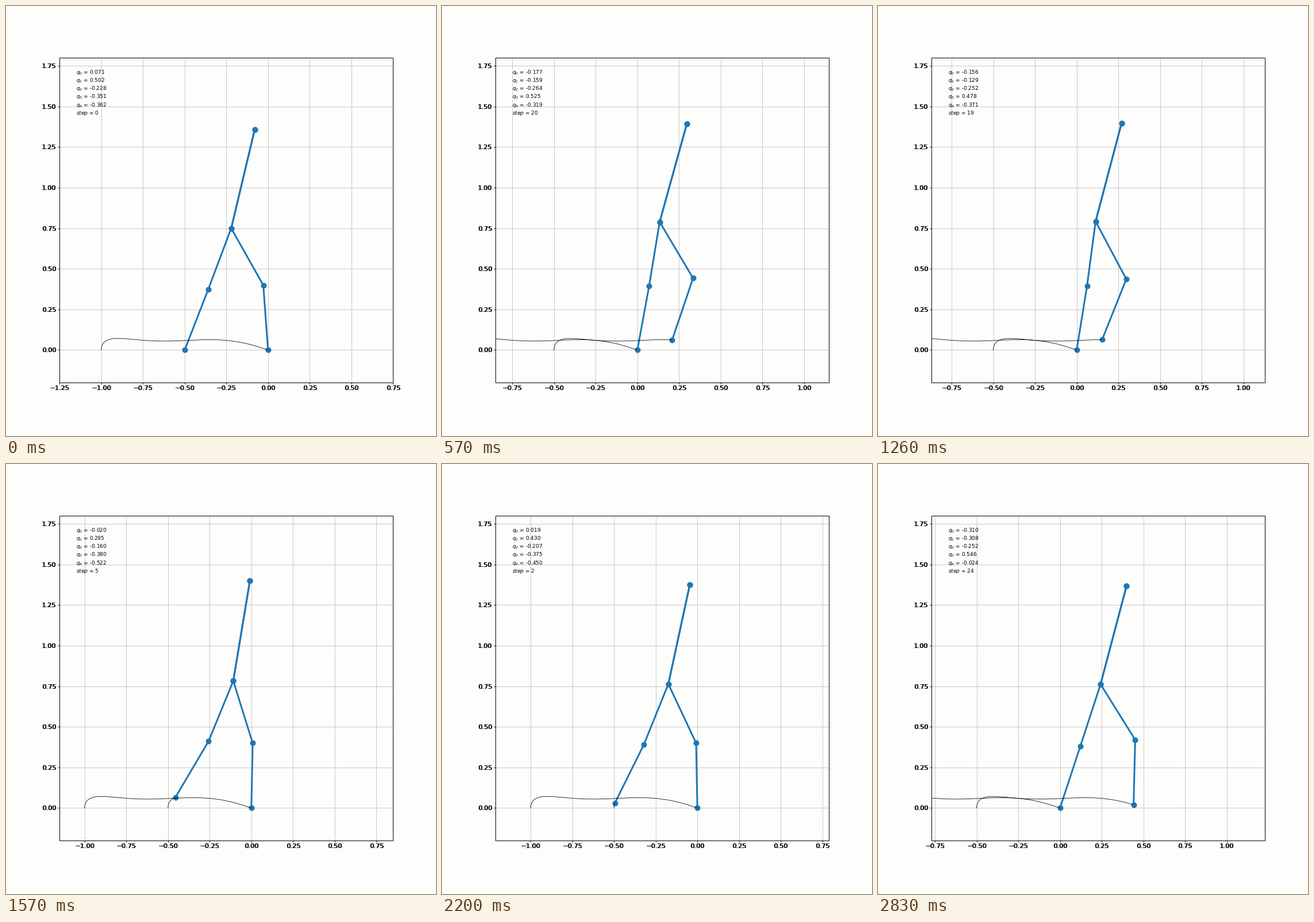
Write a matplotlib script that moves like this. It is 748x748 px and loops after 2860 ms.

```python
import numpy as np
import matplotlib.pyplot as plt
from matplotlib.animation import FuncAnimation

SIZE, DPI = 748, 88
PX = 72 / DPI                 # points per pixel
STEPS = 25                    # poses in one stride
RATE = 0.35                   # poses per 10 ms tick
STRIDE, LEG, TORSO = 0.5, 0.4, 0.625
BLUE, PAPER, GRID = "#1f77b4", "#fdfdfc", "#bcbcbc"

# Key poses: stance shin, stance thigh, torso, swing thigh, swing shin.
POSE_KEYS = {
    0: (0.071, 0.502, -0.228, -0.351, -0.362),
    3: (0.002, 0.386, -0.192, -0.384, -0.480),
    12: (-0.066, 0.043, -0.140, -0.050, -0.549),
    19: (-0.156, -0.129, -0.252, 0.478, -0.371),
    24: (-0.310, -0.308, -0.252, 0.546, -0.024),
}
# The stride ends in its first pose with the legs swapped.
POSE_KEYS[STEPS] = POSE_KEYS[0][::-1]


def stride_angles():
    """One smooth polynomial per link through the key poses."""
    t = np.array(list(POSE_KEYS)) / STEPS
    coefs = np.polyfit(t, np.array(list(POSE_KEYS.values())), len(t) - 1)
    return np.array([np.polyval(coefs, s / STEPS) for s in range(STEPS + 1)])


def link(start, angle, length):
    return start + length * np.array([-np.sin(angle), np.cos(angle)])


def pose(q):
    """Stance foot, stance knee, hip, head, swing knee, swing foot."""
    foot = np.zeros(2)
    knee = link(foot, q[0], LEG)
    hip = link(knee, q[1], LEG)
    head = link(hip, q[2], TORSO)
    swing_knee = link(hip, q[3], -LEG)
    swing_foot = link(swing_knee, q[4], -LEG)
    return np.array([foot, knee, hip, head, swing_knee, swing_foot])


angles = stride_angles()
poses = [pose(q) for q in angles]
path = np.array([p[5] for p in poses])

fig = plt.figure(figsize=(SIZE / DPI, SIZE / DPI), dpi=DPI, facecolor=PAPER)
ax = fig.add_axes([93.3 / SIZE, 93 / SIZE, 580 / SIZE, 565.2 / SIZE],
                  facecolor=PAPER)
ax.set_ylim(-0.2, 1.8)
ax.set_xticks([])
ax.set_yticks([])
for spine in ax.spines.values():
    spine.set_linewidth(PX)

xticks = np.arange(-5, 6) * 0.25
yticks = np.arange(8) * 0.25
along_x, along_y = ax.get_xaxis_transform(), ax.get_yaxis_transform()
for x in xticks:
    ax.axvline(x, color=GRID, lw=0.8 * PX, zorder=1)
for y in yticks:
    ax.axhline(y, color=GRID, lw=0.8 * PX, zorder=1)


def label(value, xy, coords, offsets, **align):
    """Tick label, drawn once per pixel offset for its heavy look."""
    text = f"{value:.2f}".replace("-", "\u2212")
    return [ax.annotate(text, xy, xycoords=coords, xytext=(dx * PX, dy * PX),
                        textcoords="offset points", fontsize=11.3 * PX,
                        **align) for dx, dy in offsets]


xlabels = [label(x, (x, 0), along_x, [(0, -5.3), (1, -5.3)],
                 ha="center", va="top") for x in xticks]
for y in yticks:
    label(y, (0, y), along_y, [(-5.3, 0), (-6.3, 0)],
          ha="right", va="center_baseline")

tick = dict(ls="", color="black", ms=2.7 * PX, mew=0.9 * PX, clip_on=False)
ax.plot(0 * yticks, yticks, marker=0, transform=along_y, **tick)
xmarks, = ax.plot([], [], marker=3, transform=along_x, **tick)

limb = dict(color=BLUE, lw=3 * PX, marker="o", ms=9 * PX, mew=PX, zorder=2)
stance, = ax.plot([], [], **limb)
swing, = ax.plot([], [], **limb)
trace = dict(color="black", lw=0.8 * PX, zorder=3)
ax.plot(path[:, 0] - STRIDE, path[:, 1], **trace)
current, = ax.plot([], [], **trace)

notes = [ax.text(0.05, 1.7 - 0.05 * i, "", transform=along_y,
                 fontsize=9 * PX, zorder=4) for i in range(6)]


def update(i):
    s = int((i + 0.5) * RATE) % STEPS
    left = -1.25 + 0.02 * s
    ax.set_xlim(left, left + 2)

    shown = (xticks > left - 1e-6) & (xticks < left + 2 + 1e-6)
    xmarks.set_data(xticks[shown], 0 * xticks[shown])
    for copies, on in zip(xlabels, shown):
        for text in copies:
            text.set_visible(on)

    joints = poses[s]
    stance.set_data(*joints[:4].T)
    swing.set_data(*joints[[3, 2, 4, 5]].T)
    current.set_data(*path[:s + 1].T)

    for n, q in enumerate(angles[s]):
        notes[n].set_text(f"$q_{n}$ = {q:.3f}")
    notes[5].set_text(f"$step$ = {s}")
    return []


anim = FuncAnimation(fig, update, frames=286, interval=10, repeat=True,
                     repeat_delay=0, blit=False)
plt.show()
```
